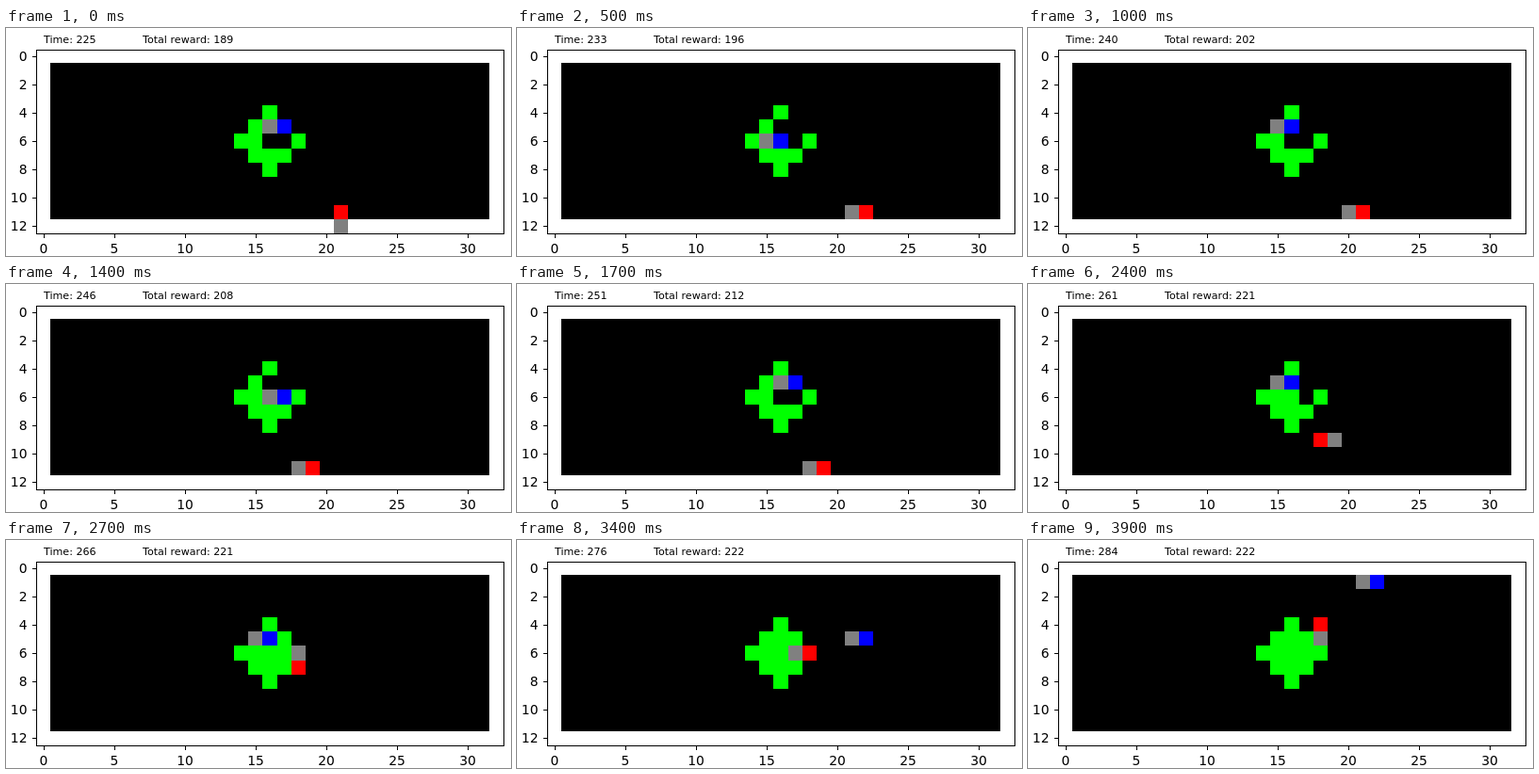
Write an HTML page with a canvas that moves like this. It is 536x242 px and loops after 4 s.

```html
<!DOCTYPE html>
<html>
<head>
<meta charset="utf-8">
<style>
html, body { margin: 0; width: 536px; height: 242px; overflow: hidden; background: #fff; }
canvas { display: block; }
</style>
</head>
<body>
<canvas id="stage" width="536" height="242"></canvas>
<script>
const ctx = document.getElementById('stage').getContext('2d');
const PITCH = 15.03, LEFT = 32, TOP = 22.3;
const DIRS = { L: [-1, 0], R: [1, 0], U: [0, -1], D: [0, 1], '.': [0, 0] };
const FIRST_STEP = 225, REGROW = 3;

// Blue: one move per game step, always facing left
const BLUE_START = 222;
const bluePath = [[16, 5]];
for (const move of 'DRU' + 'LDRUDULD' + 'RULD'.repeat(3) + 'R' + 'ULDRUDUDU' + 'LDRUL......' + 'RRRRRRR..L' + '.UURULU.') {
  const [x, y] = bluePath[bluePath.length - 1], [dx, dy] = DIRS[move];
  bluePath.push([x + dx, y + dy]);
}

// Red: step, column, row, facing, beam fired
const redKeys = [
  [0, 21, 11, 'D'], [228, 22, 11, 'D'], [230, 22, 11, 'R'], [232, 22, 11, 'L'],
  [236, 22, 11, 'R'], [239, 22, 11, 'L'], [240, 21, 11, 'L'], [243, 20, 11, 'L'],
  [245, 19, 11, 'L'], [248, 19, 11, 'L', 1], [249, 19, 11, 'L'], [252, 19, 10, 'L'],
  [254, 19, 10, 'R'], [258, 19, 9, 'U'], [260, 18, 9, 'R'], [262, 18, 8, 'R'],
  [263, 18, 7, 'R'], [264, 18, 7, 'R', 1], [265, 18, 7, 'U'], [270, 18, 6, 'U'],
  [273, 18, 6, 'L'], [280, 18, 5, 'L'], [281, 18, 4, 'D'], [282, 18, 4, 'D', 1],
  [283, 18, 4, 'D']
];
const rewardKeys = [[225, 189], [233, 196], [246, 208], [255, 216], [260, 221], [266, 221], [267, 222], [284, 222]];

const blueAt = step => bluePath[Math.max(0, step - BLUE_START)];
const redAt = step => redKeys.filter(key => key[0] <= step).pop();

function rewardAt(step) {
  const i = Math.max(1, rewardKeys.findIndex(key => key[0] >= step));
  const [s0, r0] = rewardKeys[i - 1], [s1, r1] = rewardKeys[i];
  return Math.floor(r0 + (r1 - r0) * (step - s0) / (s1 - s0));
}

function cells(x, y, w, h, color) {
  const px = v => Math.round(LEFT + PITCH * v), py = v => Math.round(TOP + PITCH * v);
  ctx.fillStyle = color;
  ctx.fillRect(px(x), py(y), px(x + w) - px(x), py(y + h) - py(y));
}
const cell = (x, y, color) => cells(x, y, 1, 1, color);

function label(text, x, y, size, align) {
  ctx.font = size + 'px "DejaVu Sans", sans-serif';
  ctx.textAlign = align;
  ctx.fillText(text, x, y);
}

function eaten(x, y, step) {
  for (let s = step - REGROW; s <= step; s++) {
    const [bx, by] = blueAt(s), [, rx, ry] = redAt(s);
    if ((bx === x && by === y) || (rx === x && ry === y)) return true;
  }
  return false;
}

function drawAxes() {
  ctx.fillStyle = '#000';
  ctx.fillRect(32, 23, 497, 1);
  ctx.fillRect(32, 218, 497, 1);
  ctx.fillRect(32, 23, 1, 196);
  ctx.fillRect(528, 23, 1, 196);
  for (let v = 0; v <= 30; v += 5) {
    const x = Math.round(LEFT + PITCH * (v + 0.5));
    ctx.fillRect(x, 219, 1, 4);
    label(v, x, 239, 13.89, 'center');
  }
  for (let v = 0; v <= 12; v += 2) {
    const y = Math.round(TOP + PITCH * (v + 0.5));
    ctx.fillRect(28, y, 4, 1);
    label(v, 22.5, y + 5, 13.89, 'right');
  }
}

function draw(step) {
  ctx.fillStyle = '#fff';
  ctx.fillRect(0, 0, 536, 242);
  cells(1, 1, 31, 11, '#000');

  for (let y = 4; y <= 8; y++)
    for (let x = 14; x <= 18; x++)
      if (Math.abs(x - 16) + Math.abs(y - 6) <= 2 && !eaten(x, y, step)) cell(x, y, '#0f0');

  const [bx, by] = blueAt(step), [, rx, ry, facing, beam] = redAt(step);
  const [dx, dy] = DIRS[facing];
  let x = rx + dx, y = ry + dy;
  do {
    cell(x, y, '#808080');
    x += dx;
    y += dy;
  } while (beam && x >= 1 && x <= 31 && y >= 1 && y <= 11);
  cell(bx - 1, by, '#808080');
  cell(bx, by, '#00f');
  cell(rx, ry, '#f00');

  drawAxes();
  label('Time: ' + step, 40, 16, 11.11, 'left');
  label('Total reward: ' + rewardAt(step), 145, 16, 11.11, 'left');
}

function tick() {
  const frame = Math.floor(performance.now() % 4000 / 100);
  draw(FIRST_STEP + Math.round(frame * 1.5));
  requestAnimationFrame(tick);
}
tick();
</script>
</body>
</html>
```
